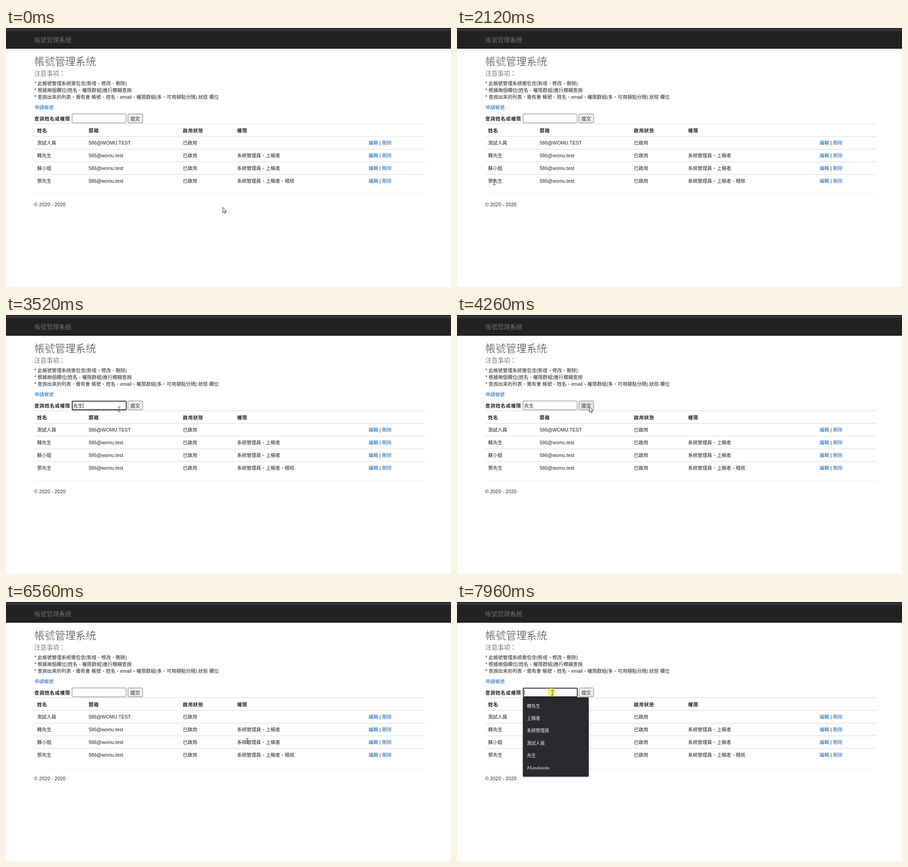
Write an HTML page that moves like this. It is 980x571 px and loops after 8000 ms.

```html
<!DOCTYPE html>
<html lang="zh-Hant">
<head>
<meta charset="utf-8">
<title>帳號管理系統</title>
<style>
  html, body { margin: 0; width: 100%; height: 100%; overflow: hidden; background: #fff; }
  svg { display: block; width: 100vw; height: 100vh; }
  text { font: 10.54px 'Liberation Sans', 'Noto Sans CJK TC', 'Noto Sans CJK', sans-serif; fill: #222; white-space: pre; }
  /* a stroke in the background colour thins the large type */
  .brand { font-size: 13.6px; fill: #9d9d9d; stroke: #222; stroke-width: .3px; }
  .title { font-size: 22.65px; stroke: #fff; stroke-width: .7px; }
  .sub { font-size: 13.55px; stroke: #fff; stroke-width: .3px; }
  .bold { font-weight: 700; letter-spacing: .75px; }
  .latin { letter-spacing: .18px; }
  .link { fill: #1467b4; }
  .white { fill: #fff; }
  .menu { font-family: 'Noto Sans', 'Noto Sans CJK TC', 'Noto Sans CJK', sans-serif; font-size: 9.8px; fill: #f1f1f1; }
</style>
</head>
<body>
<svg id="stage" viewBox="0 0 980 571" preserveAspectRatio="none"></svg>
<script>
const LOOP = 8000;
const EM = 10.54;
const MAIL = '586@womu.test';
const ROWS = [
  ['測試人員', MAIL.toUpperCase(), '已啟用', ''],
  ['韓先生', MAIL, '已啟用', '系統管理員、上稿者'],
  ['蘇小姐', MAIL, '已啟用', '系統管理員、上稿者'],
  ['鄧先生', MAIL, '已啟用', '系統管理員、上稿者、稽核']
];
const HEADS = ['姓名', '郵箱', '啟用狀態', '權限'];
const ALL_COLS = [68.5, 182, 389.5, 509, 798.5];
const HIT_COLS = [68.5, 165, 358.5, 485, 791];
const MENU = ['韓先生', '上稿者', '系統管理員', '測試人員', '先生', 'ASasdasda'];

// y is the middle of the line
const text = (x, y, str, cls = '') =>
  `<text x="${x}" y="${y + 4}" class="${cls}">${str}</text>`;
const rule = (y, color) =>
  `<rect x="62.5" y="${y}" width="861.5" height="1" fill="${color}"/>`;

function table(id, rows, cols) {
  let out = HEADS.map((h, i) => text(cols[i], 225.5, h, 'bold')).join('');
  rows.forEach((row, r) => {
    const y = 253.3 + 28 * r;
    out += rule(238.5 + 28 * r, '#d8d8d8');
    out += row.map((cell, i) => text(cols[i], y, cell)).join('');
    out += text(cols[4], y,
      '<tspan class="link">編輯</tspan> | <tspan class="link">刪除</tspan>');
  });
  const end = 253.3 + 28 * rows.length;
  return `<g id="${id}">${out}${rule(end + .3, '#ebebeb')}${text(62, end + 23.7, '© 2020 - 2020', 'latin')}</g>`;
}

const stage = document.getElementById('stage');
stage.innerHTML = `
  <rect width="980" height="571" fill="#fff"/>
  <rect width="980" height="45" fill="#222"/>
  <rect width="980" height="2" fill="#202124"/>
  <rect y="2" width="980" height="4" fill="#38383f"/>
  <rect y="44" width="980" height="1.6" fill="#080808"/>
  ${text(62.5, 27, '帳號管理系統', 'brand')}
  ${text(62.5, 77.6, '帳號管理系統', 'title')}
  ${text(62.5, 101.2, '注意事項：', 'sub')}
  ${text(62.5, 122.3, '* 此帳號管理系統需包含(新增、修改、刪除)')}
  ${text(62.5, 137.3, '* 根據兩個欄位(姓名、權限群組)進行模糊查詢')}
  ${text(62.5, 152.4, '* 查詢出來的列表，需有會 帳號、姓名、email、權限群組(多，可用頓點分隔).狀態 欄位')}
  ${text(63, 175, '申請帳號', 'link')}
  ${text(62.5, 199.7, '查詢姓名或權限', 'bold')}
  ${rule(210.5, '#d8d8d8')}
  ${table('all', ROWS, ALL_COLS)}
  ${table('hits', [ROWS[1], ROWS[3]], HIT_COLS)}
  <g id="mark"><rect y="-7.6" height="15.2" fill="#3390ff"/>${text(0, 0, '', 'white')}</g>
  <rect x="145.5" y="189.5" width="119" height="19.5" rx="1.5" fill="#fff" stroke="#767676"/>
  <rect id="focus" x="145.8" y="190" width="119" height="19.2" rx="1.5" fill="none" stroke="#101010" stroke-width="1.7"/>
  <g id="typed">${text(148, 199.7, '先生')}</g>
  <rect id="caret" y="194" width="1" height="11.5" fill="#222"/>
  <rect id="button" x="268.5" y="189.5" width="32.5" height="19.5" rx="2" stroke="#767676"/>
  ${text(274, 199.7, '提交')}
  <g id="menu">
    <rect x="144.5" y="211" width="146.5" height="176" rx="3" opacity=".18"/>
    <rect x="145" y="210" width="145" height="175" rx="2.5" fill="#292a2d"/>
    ${MENU.map((m, i) => text(154, 229.2 + 27.1 * i, m, 'menu')).join('')}
  </g>
  <circle id="press" r="9" fill="#fff04a" opacity=".9"/>
  <path id="arrow" d="M.5 .5V12.3L3.2 9.8 5 14 6.9 13.2 5.1 9.1H8.9Z" fill="#fff" stroke="#111" stroke-width=".9"/>
  <path id="beam" d="M-3 -5.5H-1L0 -4.7 1 -5.5H3M0 -4.7V4.7M-3 5.5H-1L0 4.7 1 5.5H3" fill="none" stroke="#333"/>`;

const el = {};
stage.querySelectorAll('[id]').forEach(n => el[n.id] = n);
const show = (node, on) => node.setAttribute('visibility', on ? 'visible' : 'hidden');
const move = (node, x, y) => node.setAttribute('transform', `translate(${x} ${y})`);

const tickTime = k => 180 + 20 * Math.round(92.59 * k / 20);
function tickAt(t) {
  let k = -1;
  while (tickTime(k + 1) <= t) k++;
  return k;
}

// tick, x, y of the pointer
const PATH = [
  [-1, 477, 395], [8, 286, 337], [12, 196, 334], [17, 91, 338], [19, 79, 338],
  [20, 79, 338], [21, 82, 340], [22, 82, 343], [25, 101, 342], [29, 164, 233],
  [31, 178, 209], [33, 198, 200], [34, 198, 200], [36, 249, 208], [40, 287, 201],
  [41, 287, 201], [44, 291, 202], [50, 420, 262], [55, 299, 201], [56, 298, 202],
  [57, 298, 202], [59, 556, 346], [68, 537, 307], [69, 531, 306], [70, 531, 306],
  [73, 561, 307], [74, 561, 307], [83, 209, 200], [84, 210, 200]
];
function pointerAt(k) {
  const i = PATH.findIndex(p => p[0] >= k);
  const b = PATH[i < 0 ? PATH.length - 1 : i];
  if (i <= 0 || b[0] === k) return [b[1], b[2]];
  const a = PATH[i - 1];
  const u = (k - a[0]) / (b[0] - a[0]);
  const e = u * u * (3 - 2 * u);
  return [a[1] + (b[1] - a[1]) * e, a[2] + (b[2] - a[2]) * e];
}

const WIDTHS = [33, 77, 33, 128];
function overText(x, y, cols, count) {
  if (x > 145 && x < 265 && y > 189 && y < 210) return true;
  const row = Math.round((y - 253) / 28);
  if (row < 0 || row >= count || Math.abs(y - 253 - 28 * row) > 8) return false;
  return WIDTHS.some((w, i) => x >= cols[i] && x <= cols[i] + w);
}

function select(x, y, str) {
  const [box, label] = el.mark.children;
  move(el.mark, x, y);
  box.setAttribute('width', str.length * EM);
  label.textContent = str;
}

const within = (k, a, b) => k >= a && k < b;

function draw(t) {
  const k = tickAt(t);
  const [x, y] = pointerAt(k);
  const filtered = within(k, 45, 58);
  const focused = within(k, 32, 42) || k >= 83;
  const typed = within(k, 35, 45);

  show(el.all, !filtered);
  show(el.hits, filtered);

  let picked = '';
  if (within(k, 23, 32)) {
    picked = '先生'.slice(0, k - 22);
    select(68.5 + EM, 337.3, picked);
  } else if (within(k, 71, 84)) {
    picked = '管理員'.slice(0, k - 70);
    select(509 + 2 * EM, 309.3, picked);
  }
  show(el.mark, picked);

  show(el.focus, focused);
  show(el.typed, typed);
  show(el.caret, focused);
  el.caret.setAttribute('x', typed ? 169.5 : 148);
  show(el.menu, within(k, 33, 35) || k >= 84);

  const hover = x > 268 && x < 302 && y > 189 && y < 210;
  el.button.setAttribute('fill', hover ? '#e5e5e5' : '#efefef');

  const pressed = within(k, 22, 26) || within(k, 32, 34) || within(k, 42, 44) ||
    k === 57 || within(k, 70, 74) || k >= 83;
  show(el.press, pressed);
  move(el.press, x - 2, y - 1);

  const beam = overText(x, y, filtered ? HIT_COLS : ALL_COLS, filtered ? 2 : 4);
  show(el.beam, beam);
  show(el.arrow, !beam);
  move(beam ? el.beam : el.arrow, Math.round(x), Math.round(y));
}

const start = performance.now();
function frame() {
  draw((performance.now() - start) % LOOP);
  requestAnimationFrame(frame);
}
frame();
</script>
</body>
</html>
```
